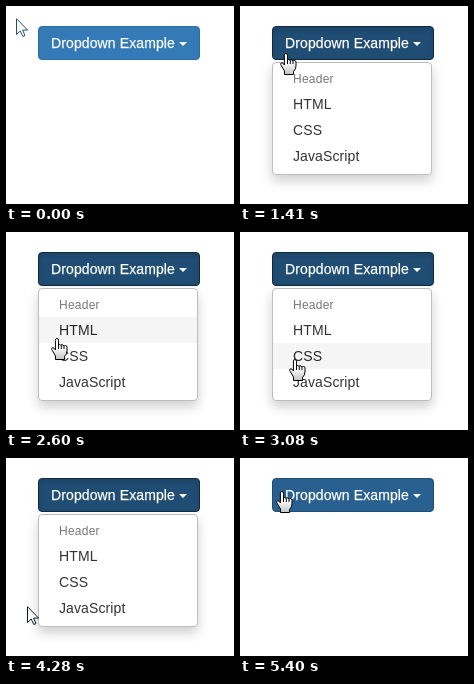
These frames come from a looping animation (228x198 px, 5.89 s). An HTML page:

```html
<!DOCTYPE html>
<html lang="en">
<head>
<meta charset="utf-8">
<title>Dropdown</title>
<style>
html, body { margin: 0; width: 100%; height: 100%; overflow: hidden; background: #fff; }
body {
  position: relative; color: #333;
  font: 14px/20px "Liberation Sans", Arial, sans-serif; letter-spacing: .11px;
}
.btn {
  position: absolute; left: 32px; top: 20px; box-sizing: border-box; width: 162px; height: 34px;
  padding: 6px 12px; border: 1px solid #2e6da4; border-radius: 4px;
  background: #337ab7; color: #fff; white-space: nowrap; -webkit-text-stroke: .25px;
}
.btn.hover { background: #286090; border-color: #204d74; }
.btn.active { background: #204d74; border-color: #122b40; box-shadow: inset 0 3px 5px rgba(0, 0, 0, .125); }
.btn.pressed { outline: 2px solid #4d90fe; outline-offset: -1px; }
.caret {
  display: inline-block; vertical-align: middle; width: 0; height: 0;
  border-top: 4px solid; border-left: 4px solid transparent; border-right: 4px solid transparent;
}
.menu {
  position: absolute; left: 32px; top: 56px; box-sizing: border-box; width: 160px; height: 113px;
  padding: 5px 0; border: 1px solid #bdbdbd; border-radius: 4px;
  background: #fff; box-shadow: 0 6px 12px rgba(0, 0, 0, .19); visibility: hidden;
}
.menu.open { visibility: visible; }
.menu div { padding: 3px 20px; }
.menu .head { font-size: 12px; line-height: 17px; letter-spacing: .25px; color: #777; }
.menu .hover { background: #f5f5f5; color: #262626; }
svg { position: absolute; left: 0; top: 0; width: 18px; height: 23px; fill: #fff; stroke: #000; }
</style>
</head>
<body>
<div class="btn">Dropdown Example <span class="caret"></span></div>
<div class="menu">
  <div class="head">Header</div>
  <div class="item">HTML</div>
  <div class="item">CSS</div>
  <div class="item">JavaScript</div>
</div>
<svg id="arrow"><path d="M.5 .7V16.5L4.2 13L6.8 18.5L9 17.6L6.6 12.1H11.6Z"/></svg>
<svg id="hand">
  <linearGradient id="shade" x2="0" y2="1">
    <stop offset=".4" stop-color="#fff"/>
    <stop offset="1" stop-color="#c4c4c4"/>
  </linearGradient>
  <path fill="url(#shade)" d="M5.8 .5Q4.4 .5 4.4 2.2V12L3.2 10.3Q1.8 9.1 .8 10.3Q.3 11.3 1.2 12.4L4.5 18V21.5H13.5V18.5Q16 16 16 13V9Q15.9 7.5 14.6 7.5Q13.4 7.4 12.8 8Q12.2 6.7 10.8 6.7Q9.8 6.7 9.4 7.2Q8.8 6 7.5 6V2.2Q7.4 .5 5.8 .5Z"/>
  <path fill="none" d="M7.5 6V11M10.3 7.2V11M13 8V11"/>
</svg>
<script>
const LOOP = 5890, STEP = 80;
const PRESS = 930, OPEN = 1090, PRESS_AGAIN = 5320, CLOSE = 5400;

// Pointer moves: start time, steps, ease-out power, then from, bend and to points
const moves = [
  { at: 220, steps: 5, ease: 1, path: [10, 12, 28, 23, 46, 34] },
  { at: 1410, steps: 8, ease: 3, path: [46, 34, 46, 53, 43, 73] },
  { at: 2040, steps: 8, ease: 1.25, path: [43, 73, 48, 89, 51, 106] },
  { at: 2680, steps: 8, ease: 1, path: [51, 106, 54, 120, 56, 134] },
  { at: 3320, steps: 8, ease: 1, path: [56, 134, 62, 148, 42, 161] },
  { at: 3960, steps: 8, ease: 1, path: [42, 161, 24, 169, 10, 119] },
  { at: 4610, steps: 8, ease: 1.47, path: [10, 119, 10, 76, 42, 33] }
];

const $ = s => document.querySelector(s);
const btn = $('.btn'), menu = $('.menu'), arrow = $('#arrow'), hand = $('#hand');
const items = [...document.querySelectorAll('.item')];

function pointer(t) {
  const move = moves.filter(m => t >= m.at).pop();
  if (!move) return [10, 12];
  const u = Math.min(1, (Math.floor((t - move.at) / STEP + .02) + 1) / move.steps);
  const p = 1 - (1 - u) ** move.ease, q = 1 - p;
  const [x0, y0, x1, y1, x2, y2] = move.path;
  const bend = (a, b, c) => Math.round(q * q * a + 2 * q * p * b + p * p * c);
  return [bend(x0, x1, x2), bend(y0, y1, y2)];
}

function draw(t) {
  const [x, y] = pointer(t);
  const open = t >= OPEN && t < CLOSE;
  const pressed = (t >= PRESS && t < OPEN) || (t >= PRESS_AGAIN && t < CLOSE);
  const overBtn = x >= 32 && x < 194 && y >= 20 && y < 54;
  const row = open && x >= 33 && x < 191 ? Math.floor((y - 85) / 26) : -1;
  const link = overBtn || (row >= 0 && row < items.length);

  btn.classList.toggle('hover', overBtn);
  btn.classList.toggle('active', open || pressed);
  btn.classList.toggle('pressed', pressed);
  menu.classList.toggle('open', open);
  items.forEach((el, i) => el.classList.toggle('hover', i === row));

  arrow.style.visibility = link ? 'hidden' : 'visible';
  hand.style.visibility = link ? 'visible' : 'hidden';
  arrow.style.stroke = t < PRESS ? '#20507f' : '#0c1826';
  arrow.style.transform = `translate(${x}px, ${y}px)`;
  hand.style.transform = `translate(${x - 6}px, ${y}px)`;
}

const start = performance.now();
function tick() {
  draw((performance.now() - start) % LOOP);
  requestAnimationFrame(tick);
}
tick();
</script>
</body>
</html>
```
